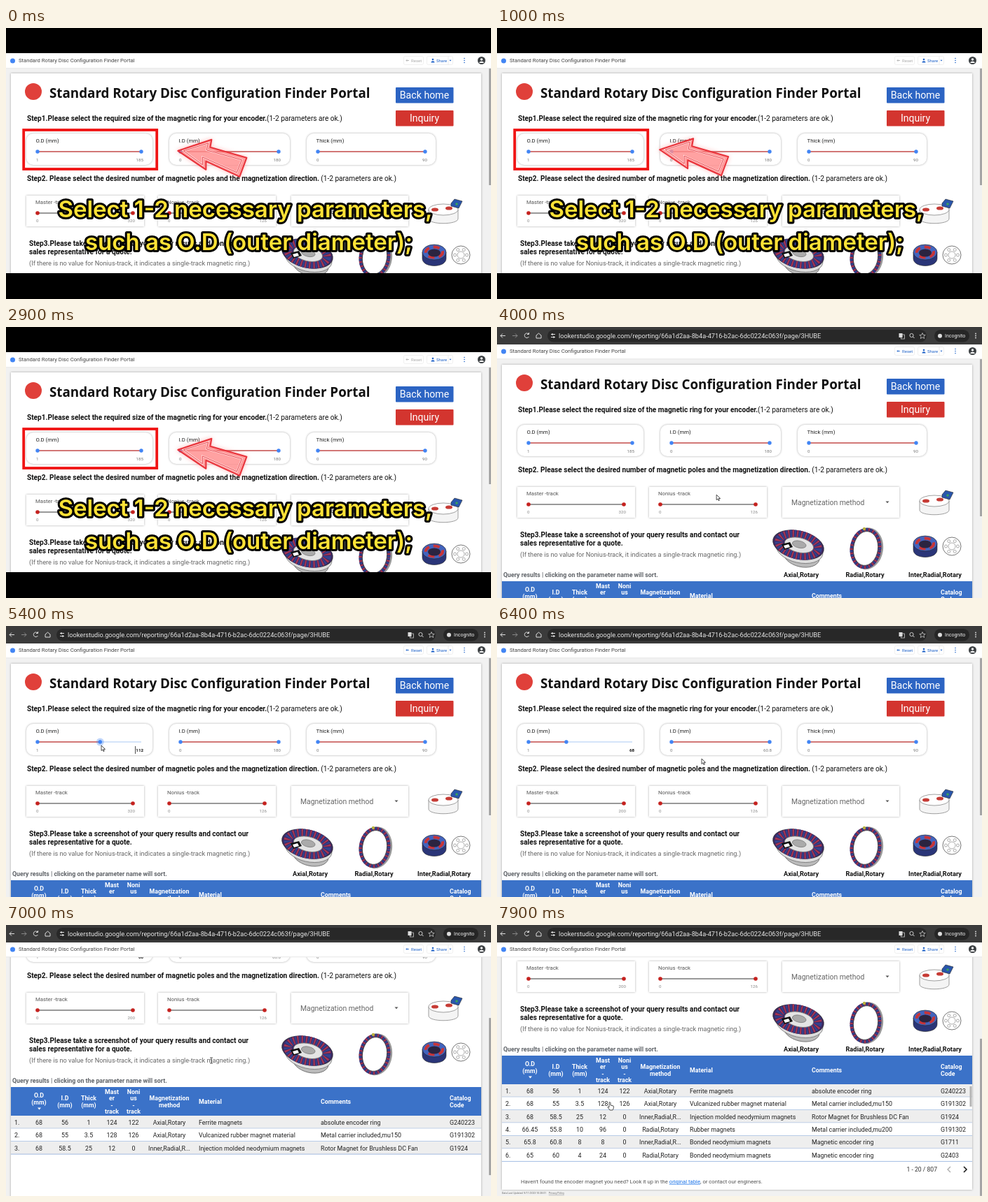
An HTML page for the animation above (8 s loop, 692x388 px).

```html
<!DOCTYPE html>
<html lang="en">
<head>
<meta charset="utf-8">
<title>Parameter lookup</title>
<style>
html, body { margin: 0; width: 100%; height: 100%; overflow: hidden; background: #000; }
svg { display: block; width: 692px; height: 388px; font-family: Roboto, Arial, sans-serif; }
text { white-space: pre; }
.card { fill: #fff; filter: drop-shadow(0 .8px 1.4px #0005); }
.sub { font: 600 33px Inter, sans-serif; fill: #ffe236; stroke: #000; stroke-width: 6px; stroke-linejoin: round; paint-order: stroke; }
.title { font-family: "Open Sans", "Noto Sans", sans-serif; }
.glow { filter: drop-shadow(0 0 3px #f446); }
</style>
</head>
<body>
<svg id="stage" viewBox="0 0 692 388">
<defs>
<clipPath id="intro"><rect y="57" width="692" height="294"/></clipPath>
<clipPath id="page"><rect y="46" width="692" height="342"/></clipPath>
</defs>
<g id="scene"></g>
</svg>
<script>
const LOOP = 8000, STEP = 100, CUT = 3900;
const NAME = 'Standard Rotary Disc Configuration Finder Portal';
const BLUE = '#3b72c8', RED = '#c5221f', DOT = '#4285f4', GREY = '#f1f1f1';
const scene = document.getElementById('scene');

// Text centred vertically on y
const text = (x, y, size, str, fill = '#222', bold = 0, anchor = 'start', extra = '') =>
  `<text x="${x}" y="${y + size * .36}" font-size="${size}" fill="${fill}" font-weight="${bold ? 700 : 400}" text-anchor="${anchor}" ${extra}>${str}</text>`;
const mid = (x, y, size, str, fill, bold) => text(x, y, size, str, fill, bold, 'middle');
const rect = (x, y, w, h, fill, extra = '') => `<rect x="${x}" y="${y}" width="${w}" height="${h}" fill="${fill}" ${extra}/>`;
const circle = (x, y, r, fill, extra = '') => `<circle cx="${x}" cy="${y}" r="${r}" fill="${fill}" ${extra}/>`;
const oval = (x, y, rx, ry, fill, extra = '') => `<ellipse cx="${x}" cy="${y}" rx="${rx}" ry="${ry}" fill="${fill}" ${extra}/>`;
const path = (d, fill, stroke = 'none', w = 1, extra = '') => `<path d="${d}" fill="${fill}" stroke="${stroke}" stroke-width="${w}" ${extra}/>`;
const line = (x1, y1, x2, y2, stroke, w = 1) => path(`M${x1} ${y1}L${x2} ${y2}`, 'none', stroke, w);
const group = (x, y, body, extra = '') => `<g transform="translate(${x} ${y})" ${extra}>${body}</g>`;

// Piecewise linear value from [time, value] pairs
function track(t, keys) {
  if (t <= keys[0][0]) return keys[0][1];
  for (let i = 1; i < keys.length; i++) {
    const [a, u] = keys[i - 1], [b, v] = keys[i];
    if (t < b) return u + (v - u) * (t - a) / (b - a);
  }
  return keys[keys.length - 1][1];
}

function sizeSlider(card, w, x, end, label, low, high, knob = end, drag = false) {
  const cut = knob < end;
  return rect(card, 140, w, 45, '#fff', 'rx="10" class="card"') +
    text(x - 2.5, 150, 7.8, label) +
    line(x, 166, end, 166, '#c6dbf7', 1.6) + line(x, 166, knob, 166, '#d2534b', 1.6) +
    (drag ? circle(knob, 166, 5.5, '#4285f455') : '') +
    circle(x, 166, 2.7, DOT) + circle(knob, 166, 2.7, DOT) +
    text(x - 2, 178, 6.2, low, '#777') +
    text(end + 3, 178, 6.2, high, cut ? '#111' : '#777', cut, 'end') +
    (drag ? line(184.5, 172, 184.5, 183, '#222', .8) : '');
}

function poleSlider(card, label, high) {
  const x = card + 16, end = x + 136;
  return rect(card, 229, 168, 44, '#fff', 'class="card"') + text(x - 3, 238, 7.8, label, '#555') +
    line(x, 254, end, 254, '#777', 1.5) + circle(x, 254, 2.8, RED) + circle(end, 254, 2.8, RED) +
    text(x - 2, 265, 6.2, '0', '#888') + text(end + 3, 265, 6.2, high, '#888', 0, 'end');
}

function devices() {
  const band = (rx, ry, w) => ['#3d2a63', '#a83450', '#33428f'].map((c, i) =>
    oval(0, 0, rx, ry, 'none', `stroke="${c}" stroke-width="${w}" ${i ? `stroke-dasharray="2 4" stroke-dashoffset="${i * 3}"` : ''}`)).join('');
  const holes = Array.from({ length: 6 }, (_, i) =>
    circle(649 + 8.5 * Math.cos(i * Math.PI / 3), 314 + 8.5 * Math.sin(i * Math.PI / 3), 2, '#fff', 'stroke="#777" stroke-width=".6"')).join('');
  return group(430, 312, '<g transform="rotate(13)">' +
      oval(8, 14, 26, 16, '#bbb', 'stroke="#666" stroke-width=".8"') + oval(3, 6, 34, 19, '#ddd', 'stroke="#777" stroke-width=".8"') +
      oval(0, 0, 37, 20, '#3d2a63', 'stroke="#222" stroke-width=".7"') + band(28.5, 15, 11) +
      oval(1, 0, 21, 10.5, '#e4e4e4', 'stroke="#777" stroke-width=".8"') + oval(1, -1, 10, 5, '#aaa', 'stroke="#666" stroke-width=".6"') + '</g>') +
    path('M406 311l12-3 4 7-12 4z', '#111') + path('M409 313l7-2 2 4-7 2z', '#fff') +
    group(526, 317, '<g transform="rotate(8)">' + oval(2, 0, 21, 28, 'none', 'stroke="#999" stroke-width="4"') +
      band(20, 27, 4.5) + oval(0, 0, 17.5, 24.5, 'none', 'stroke="#333" stroke-width=".8"') + '</g>') +
    circle(524, 289, 2.2, '#b8b13c') +
    path('M594 310v9c0 14 34 14 34 0v-9z', '#2a3578', '#222', .6) +
    oval(611, 310, 17, 11, '#4263bd', 'stroke="#222" stroke-width=".6"') +
    oval(611, 310, 12, 7.5, 'none', 'stroke="#c73538" stroke-width="4" stroke-dasharray="9 6"') + oval(611, 311, 9, 5.5, '#2b2440') +
    circle(649, 314, 13, '#fff', 'stroke="#555" stroke-width=".8"') + circle(649, 314, 5, 'none', 'stroke="#777" stroke-width=".6"') + holes +
    path('M603 249v13c0 9 42 9 42 0v-13z', '#f4f4f4', '#777', .7) +
    oval(624, 249, 21, 8, '#fff', 'stroke="#777" stroke-width=".7"') +
    oval(612, 249, 5, 2.6, '#c63b35') + oval(632, 247, 5, 2.6, '#c63b35') +
    path('M635 240l5-6 11 3-5 10-11-3z', '#2956ac', '#222', .6) + circle(643, 241, 1.8, '#3ba15c');
}

const COLUMNS = [12, 47, 84, 118, 151, 182, 233, 275, 449, 633];
const ROWS = [
  '68|56|1|124|122|Axial,Rotary|Ferrite magnets|absolute encoder ring|G240223',
  '68|55|3.5|128|126|Axial,Rotary|Vulcanized rubber magnet material|Metal carrier included,mu150|G191302',
  '68|58.5|25|12|0|Inner,Radial,R...|Injection molded neodymium magnets|Rotor Magnet for Brushless DC Fan|G1924',
  '66.45|55.8|10|96|0|Radial,Rotary|Rubber magnets|Metal carrier included,mu200|G191302',
  '65.8|60.8|8|8|0|Inner,Radial,R...|Bonded neodymium magnets|Magnetic encoder ring|G1711',
  '65|60|4|24|0|Radial,Rotary|Bonded neodymium magnets|Magnetic encoder ring|G2403'
];

function table(count) {
  const heads = ['', 'O.D|(mm)', 'I.D|(mm)', 'Thick|(mm)', 'Mast|er|-|track', 'Noni|us|-|track', 'Magnetization|method', 'Material', 'Comments', 'Catalog|Code'];
  let out = rect(7, 364, 671, 41, BLUE);
  heads.forEach((head, c) => head.split('|').forEach((word, i, all) => {
    const y = 385 + (i - (all.length - 1) / 2) * 9.4 - (c == 1 ? 4 : 0);
    out += text(COLUMNS[c], y, 8.8, word, '#fff', 1, c > 6 ? 'start' : 'middle');
  }));
  out += path('M45 393.5h5l-2.5 3z', '#fff');
  ROWS.slice(0, count).forEach((row, r) => {
    const y = 405 + r * 18.45;
    out += rect(7, y, 671, 18.45, r % 2 ? '#fff' : '#eee') + line(7, y + 18.2, 678, y + 18.2, '#7fa3d8', .7);
    [r + 1 + '.', ...row.split('|')].forEach((cell, c) => {
      out += text(COLUMNS[c], y + 9.4, 8.9, cell, '#222', 0, c && c < 7 ? 'middle' : 'start');
    });
  });
  if (count > 3) out += rect(674.5, 408, 3, 29, '#b5b5b5') +
    text(628, 526.5, 8.6, '1 - 20 / 807', '#333', 0, 'end') +
    path('M647 523l-4 4 4 4', 'none', '#aaa', 1.3) + path('M666 523l4 4-4 4', 'none', '#111', 1.5) +
    text(34, 544, 7.7, 'Haven\'t found the encoder magnet you need? Look it up in the <tspan fill="#1a73e8" text-decoration="underline">original table</tspan>, or contact our engineers.', '#555');
  return out;
}

function page(s) {
  const knob = 45 + (s.od - 1) / 184 * 148;
  const captions = s.captions ? mid(434, 355, 9.2, 'Axial,Rotary', '#111', 1) +
    mid(525, 355, 9.2, 'Radial,Rotary', '#111', 1) + mid(625, 355, 9.2, 'Inter,Radial,Rotary', '#111', 1) : '';
  return rect(7, 54, 671, 502, '#fff', 'class="card"') + circle(39, 80, 12, '#e0403a') +
    text(62, 82, 18.8, NAME, '#111', 1, 'start', 'class="title"') +
    rect(556, 74, 82.5, 22.5, '#2c64c3', 'rx="1"') + mid(597, 85.3, 14.2, 'Back home', '#fff') +
    rect(556, 107, 82.5, 22.5, '#d3352f', 'rx="1"') + mid(597, 118.3, 14, 'Inquiry', '#fff') +
    text(30, 118, 10.1, '<tspan font-weight="700">Step1.Please select the required size of the magnetic ring for your encoder.</tspan>(1-2 parameters are ok.)', '#111') +
    sizeSlider(29, 180, 45, 193, 'O.D (mm)', 1, Math.round(s.od), knob, s.drag) +
    sizeSlider(233, 172, 249, 389, 'I.D (mm)', 0, s.filtered ? '60.8' : 180) +
    sizeSlider(429, 184, 445, 598, 'Thick (mm)', 0, 90) +
    text(30, 204, 10.1, '<tspan font-weight="700">Step2. Please select the desired number of magnetic poles and the magnetization direction.</tspan> (1-2 parameters are ok.)', '#111') +
    poleSlider(29, 'Master -track', s.filtered ? 200 : 320) + poleSlider(217, 'Nonius -track', 126) +
    rect(407, 229, 167, 44, '#fff', 'class="card"') + text(420, 251.5, 10.4, 'Magnetization method', '#666') +
    path('M554.5 249.5h5l-2.5 2.7z', '#555') + devices() +
    text(33, 297, 10.1, 'Step3.Please take a screenshot of your query results and contact our', '#111', 1) +
    text(33, 309, 10.1, 'sales representative for a quote.', '#111', 1) +
    text(33, 325.5, 9.2, '(If there is no value for Nonius-track, it indicates a single-track magnetic ring.)', '#666') +
    captions + text(9, 354.5, 8.8, 'Query results | clicking on the parameter name will sort.', '#5f6368', 1) + table(s.rows) +
    text(7, 561, 3.6, 'Data Last Updated: 9/11/2023 10:28:01    <tspan text-decoration="underline">Privacy Policy</tspan>', '#666');
}

// Report bar, drawn around y = 34.5
function bar(active) {
  const share = '#1f62c8', reset = active ? share : '#aaa';
  return rect(0, 25, 692, 21, '#fff') + line(0, 45.7, 692, 45.7, '#ddd', .7) +
    circle(9.5, 35, 3.5, DOT) + text(18, 34.5, 7.7, NAME, '#444') +
    rect(567.5, 28.5, 28, 12, '#fff', 'rx="2" stroke="#e6e6e6" stroke-width=".6"') +
    path('M575 34.5h-4m1.5-1.5l-1.5 1.5 1.5 1.5', 'none', reset, .8) + text(578, 34.5, 6, 'Reset', reset) +
    rect(600.5, 28.5, 37, 12, '#fff', 'rx="2" stroke="#e6e6e6" stroke-width=".6"') + line(631, 28.5, 631, 40.5, '#ddd', .6) +
    circle(609, 33, 1.3, share) + path('M606.5 37.5c0-3 5-3 5 0z', share) + text(614, 34.5, 6, 'Share', share) +
    path('M632.5 33.8h3l-1.5 1.7z', share) +
    [31.5, 34.5, 37.5].map(y => circle(654, y, .8, share)).join('') +
    circle(678.5, 34.5, 5.5, '#3c4043') + circle(678.5, 33, 1.7, '#fff') + path('M675 38c1-3 6-3 7 0z', '#fff');
}

function browser() {
  const ink = '#ddd';
  return rect(0, 0, 692, 25, '#3b3b3b') + rect(72, 4, 541, 17.5, '#282828', 'rx="8.7"') +
    path('M12 12.5h-7m3-3l-3 3 3 3', 'none', ink, 1) + path('M22 12.5h7m-3-3l3 3-3 3', 'none', '#888', 1) +
    path('M45 10a3.3 3.3 0 1 0 .4 4M45.5 8v2.5h-2.5', 'none', ink, 1) + path('M56 12l3.5-3 3.5 3v4h-7z', 'none', ink, 1) +
    line(77, 10.5, 83, 10.5, ink) + line(77, 14.5, 83, 14.5, ink) + circle(79, 10.5, 1.2, ink) + circle(81, 14.5, 1.2, ink) +
    text(88, 12.5, 9.2, 'lookerstudio.google.com/reporting/66a1d2aa-8b4a-4716-b2ac-6dc0224c063f/page/3HUBE', '#e6e6e6') +
    rect(573.5, 9, 5, 6, ink) + rect(576.5, 11, 5, 6, 'none', `stroke="${ink}" stroke-width=".7"`) +
    circle(591.5, 12, 2.6, 'none', `stroke="${ink}" stroke-width=".9"`) + line(593.5, 14, 595.5, 16, ink) +
    path('M607 8.5l1.2 2.8 3 .2-2.3 2 .8 3-2.7-1.7-2.7 1.7.8-3-2.3-2 3-.2z', 'none', ink, .7) +
    rect(624, 4, 50, 17.5, '#262626', 'rx="8.7"') + circle(632, 12.8, 3, ink) + text(639, 12.8, 7, 'Incognito', '#eee') +
    [9.5, 12.5, 15.5].map(y => circle(683, y, .9, ink)).join('');
}

function scrollbar(scroll, length) {
  return rect(688, 46, 4, 342, GREY) + rect(689, 46 + scroll * .66, 3, length, '#a5a5a5');
}

function pointer(t) {
  const x = track(t, [[3900, 330], [4700, 195], [4800, 195], [5400, 136], [5800, 100], [5900, 100], [6400, 292], [7300, 292], [7700, 160]]);
  const y = track(t, [[3900, 250], [4700, 171], [5900, 171], [6400, 190], [7300, 190], [7700, 254]]);
  const shape = t >= 7700
    ? path('M0 0c1-1 2 0 2 1v3l4 1c1 1 0 5-1 6h-4l-3-4c0-1 1-1 2 0z', '#fff', '#222', .8)
    : t >= 6900 && t < 7300
      ? path('M-1 0h4M1 0v8M-1 8h4', 'none', '#333', .8)
      : path('M0 0v7.5l1.8-1.6 1.2 2.7 1.3-.6-1.2-2.6h2.4z', '#fff', '#222', .8);
  return group(x, y, shape);
}

function intro(t) {
  const sway = Math.cos((t - 125) / 1450 * 2 * Math.PI) * 8;
  const arrow = 'M0 0L48-16 46-5 98 10 88 37 40 15 40 27Z';
  const inner = 'M8 0L43-11 41-1 91 13 84 31 35 9 35 20Z';
  return rect(0, 36, 692, 315, GREY) +
    `<g clip-path="url(#intro)">` + group(0, 11, page({ od: 185, rows: 0, captions: true }) + scrollbar(0, 168)) + '</g>' +
    rect(0, 36, 692, 2, '#fff') + group(0, 12, bar(false)) +
    rect(25.2, 146, 190, 56, 'none', 'stroke="#f01414" stroke-width="3.8"') +
    group(238.5 + sway, 175 + sway * .12,
      path(arrow, '#ff7d7d99', '#e8323a', 2, 'stroke-linejoin="round"') +
      path(inner, '#ffb0b055', '#ffe0e0', 2.4) + path(inner, 'none', '#e8454c', 1), 'class="glow"') +
    '<g class="sub" text-anchor="middle"><text x="341.5" y="271">Select 1-2 necessary parameters,</text>' +
    '<text x="346.5" y="318">such as O.D (outer diameter);</text></g>';
}

function recording(t) {
  const scroll = track(t, [[6400, 0], [6700, 67], [7000, 132], [7300, 177]]);
  const loading = t >= 6900 && t < 7200;
  const state = {
    od: track(t, [[4800, 185], [5400, 112], [5800, 68]]),
    drag: t >= 4800 && t < 6000,
    filtered: t >= 6100,
    rows: t < 7200 ? 3 : 6,
    captions: !loading
  };
  return rect(0, 0, 692, 388, GREY) +
    '<g clip-path="url(#page)">' + group(0, -scroll, page(state)) + '</g>' +
    scrollbar(scroll, 225) + bar(true) + browser() + pointer(t);
}

let last = -1;
function frame(now) {
  const t = Math.floor(now % LOOP / STEP) * STEP;
  if (t !== last) {
    last = t;
    scene.innerHTML = t < CUT ? intro(t) : recording(t);
  }
  requestAnimationFrame(frame);
}
frame(performance.now());
</script>
</body>
</html>
```
